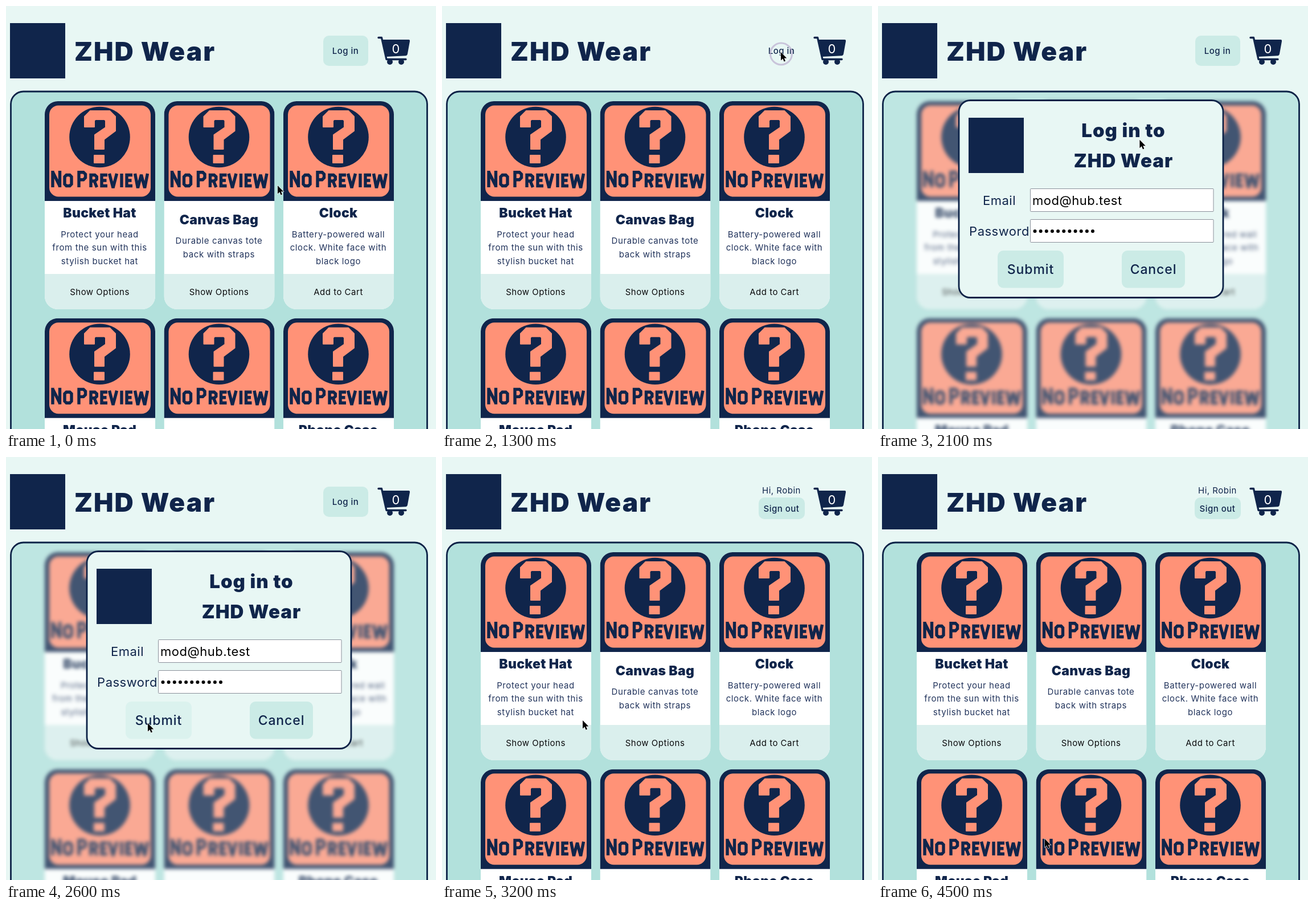
Recreate the animation shown at these times as an HTML page. Size 755 by 742 pixels, loop 4600 ms.

```html
<!DOCTYPE html>
<html lang="en">
<head>
<meta charset="utf-8">
<title>Shop login</title>
<style>
  html, body { margin: 0; width: 100%; height: 100%; overflow: hidden; background: #e8f7f4; }
  svg { display: block; width: 100%; height: 100%; }
  text { font-family: Inter, "Open Sans", sans-serif; font-size: 15px; letter-spacing: .5px; fill: #10254b; }
  .mid { text-anchor: middle; }
  .brand { font-size: 46px; font-weight: 900; letter-spacing: 2px; }
  .name { font-size: 23px; font-weight: 900; letter-spacing: .3px; }
  .desc { letter-spacing: .6px; fill: #22345c; }
  .action { fill: #0b0b0d; }
  .button { font-weight: 500; }
  .heading { font-size: 33px; font-weight: 900; letter-spacing: 1px; }
  .field { font-size: 22px; }
  .value { fill: #000; }
  .big { font-size: 23px; font-weight: 500; letter-spacing: .9px; }
  .navy { fill: #10254b; }
  .soft { fill: #cbebe6; }
  .input { fill: #fff; stroke: #8b919b; }
  .frame { fill: none; stroke: #0c2247; stroke-width: 2.8; }
</style>
</head>
<body>
<svg viewBox="0 0 755 742">
  <defs>
    <clipPath id="cardShape"><rect width="194" height="365" rx="23"/></clipPath>
    <g id="preview">
      <rect class="navy" width="194" height="175"/>
      <rect x="8" y="7.5" width="178" height="160" rx="16" fill="#ff9277"/>
      <circle class="navy" cx="96.5" cy="63" r="53.3"/>
      <g fill="#ff9277" stroke="#ff9277" stroke-width="2" stroke-linejoin="round">
        <path d="M70 45V27L80 17H114L124 27V52L104 67V84H88V59L107 46V34L105 32H89L87 34V45z"/>
        <rect x="87" y="95" width="17" height="13"/>
      </g>
      <path role="img" aria-label="No Preview" fill="none" stroke="#10254b" stroke-width="5.4" d="
        M14 151V122M26.5 151V122M14 124L26.5 149
        M38 129.5h6l3 3v13l-3 3h-6l-3-3v-13z
        M60 151V124.7h8l3.5 3.5v6l-3.5 3.5h-8
        M81 151V129.5h7l3.3 3v4.5l-3.3 3h-7M87 140l4.5 11
        M110 129.5H100V148.5H110M100 139H108.5
        M113.5 127l6 23h1l6-23
        M135 127V151
        M154 129.5H144V148.5H154M144 139H152.5
        M158.5 127l4.5 23h1l5-19h1l5 19h1l4.5-23"/>
    </g>
  </defs>

  <rect class="navy" x="7" y="30" width="97" height="97"/>
  <text class="brand" x="120" y="96">ZHD Wear</text>

  <g id="guest">
    <rect id="login" class="soft" x="557" y="52" width="79" height="53" rx="10"/>
    <text class="mid button" x="596" y="84">Log in</text>
  </g>
  <g id="member">
    <text class="mid" x="596" y="64">Hi, Robin</text>
    <rect class="soft" x="556" y="71" width="81" height="38" rx="10"/>
    <text class="mid button" x="596" y="95.5">Sign out</text>
  </g>

  <path class="navy" d="M660 59H707Q709.500 59 709 62L705 84Q704.500 87 701.500 87.300L667 89z"/>
  <path d="M654 55.500h5.500L668 93.500H702" fill="none" stroke="#10254b" stroke-width="3.4" stroke-linecap="round" stroke-linejoin="round"/>
  <circle class="navy" cx="674" cy="98" r="5"/>
  <circle class="navy" cx="694" cy="98" r="5"/>
  <text class="mid" x="684.500" y="83" style="font-size:22px;fill:#fff;letter-spacing:0">0</text>

  <g id="shop">
    <rect x="8.500" y="150" width="731" height="700" rx="22" fill="#b2e1dc"/>
    <g id="cards"></g>
  </g>
  <rect class="frame" x="8.500" y="150" width="731" height="700" rx="22"/>

  <g id="dialog">
    <rect class="frame" x="142" y="165.500" width="464" height="346" rx="20" style="fill:#e8f7f4"/>
    <rect class="navy" x="159" y="196" width="97" height="97"/>
    <text class="mid heading" x="431" y="230">Log in to</text>
    <text class="mid heading" x="431" y="282.500">ZHD Wear</text>
    <text class="mid field" x="213" y="349">Email</text>
    <text class="mid field" x="213" y="403">Password</text>
    <rect class="input" x="267.500" y="320.500" width="321.500" height="40" rx="1"/>
    <rect class="input" x="267.500" y="374.500" width="321.500" height="40" rx="1"/>
    <text class="field value" x="271" y="349">mod@hub.test</text>
    <path d="M275.500 395H378" stroke="#000" stroke-width="6" stroke-linecap="round" stroke-dasharray="0 10.15"/>
    <rect id="submit" class="soft" x="210" y="429" width="116" height="65.500" rx="10"/>
    <rect class="soft" x="428" y="429" width="111" height="65.500" rx="10"/>
    <text class="mid big" x="268" y="470">Submit</text>
    <text class="mid big" x="483.500" y="470">Cancel</text>
  </g>

  <circle id="ring" cx="595.500" cy="84" r="19" fill="none" stroke="#b9a9cc" stroke-opacity=".65" stroke-width="3"/>
  <path id="pointer" d="M0 0V14.500L3.400 11.300L5.600 16.500L8 15.400L5.800 10.400H10.300z" stroke="#fff" stroke-width="1.100" paint-order="stroke"/>
</svg>
<script>
const el = id => document.getElementById(id);
const LOOP = 4600, STEP = 100;

const products = [
  ['Bucket Hat', 'Show Options', 'Protect your head', 'from the sun with this', 'stylish bucket hat'],
  ['Canvas Bag', 'Show Options', 'Durable canvas tote', 'back with straps'],
  ['Clock', 'Add to Cart', 'Battery-powered wall', 'clock. White face with', 'black logo'],
  ['Mouse Pad', '', '', '', ''],
  ['', ''],
  ['Phone Case', '', '', '', '']
];

const label = (style, y, text) => `<text class="mid ${style}" x="96.5" y="${y}">${text}</text>`;

function card([name, action, ...lines], i) {
  const x = 68 + i % 3 * 209.5, y = 167 + Math.floor(i / 3) * 380.7;
  const top = 204 + (3 - lines.length) * 11.75;
  return `<g transform="translate(${x} ${y})"><g clip-path="url(#cardShape)">
    <rect width="194" height="365" fill="#fff"/>
    <rect y="303" width="194" height="62" fill="#daefed"/>
    <use href="#preview"/></g>
    ${label('name', top, name)}
    ${lines.map((line, n) => label('desc', top + 34.5 + n * 23.5, line)).join('')}
    ${label('action', 340, action)}</g>`;
}
el('cards').innerHTML = products.map(card).join('');

// Keys are [time, value, value, ...] with eased motion between them
function track(keys, t) {
  const n = keys.findIndex(key => key[0] > t);
  if (n < 0) return keys[keys.length - 1].slice(1);
  const [t0, ...from] = keys[n - 1], [t1, ...to] = keys[n];
  const u = (t - t0) / (t1 - t0), ease = u * u * (3 - 2 * u);
  return from.map((v, i) => v + (to[i] - v) * ease);
}

const pointerKeys = [
  [0, 477, 315], [200, 477, 315], [1100, 595, 81], [1400, 595, 81], [1600, 596, 84],
  [1800, 596, 84], [2500, 249, 467], [2900, 249, 467], [3100, 247, 462],
  [4100, 247, 462], [4500, 293, 670]
];
const loginKeys = [[0, 1], [1000, 1], [1200, 0], [1600, 0], [1800, 1]];
const submitKeys = [[0, 1], [2400, 1], [2600, .45]];

const show = (id, on) => el(id).style.display = on ? '' : 'none';

function draw(now) {
  const t = Math.floor(now % LOOP / STEP) * STEP;
  const within = (a, b) => t >= a && t < b;
  const open = within(1400, 3000), signedIn = t >= 3000;
  const [x, y] = track(pointerKeys, t);
  const submitting = within(2700, 2900);

  show('dialog', open);
  show('guest', !signedIn);
  show('member', signedIn);
  el('shop').style.opacity = open ? .77 : 1;
  el('cards').style.filter = open ? 'blur(3px)' : 'none';
  el('login').style.opacity = track(loginKeys, t)[0];
  el('submit').style.opacity = track(submitKeys, t)[0];

  show('ring', within(1200, 1400) || submitting);
  el('ring').setAttribute('transform', `translate(${x - 595} ${y - 81})`);
  el('pointer').setAttribute('transform', `translate(${x} ${y})`);
}

const start = performance.now();
function tick() {
  draw(performance.now() - start);
  requestAnimationFrame(tick);
}
tick();
</script>
</body>
</html>
```
